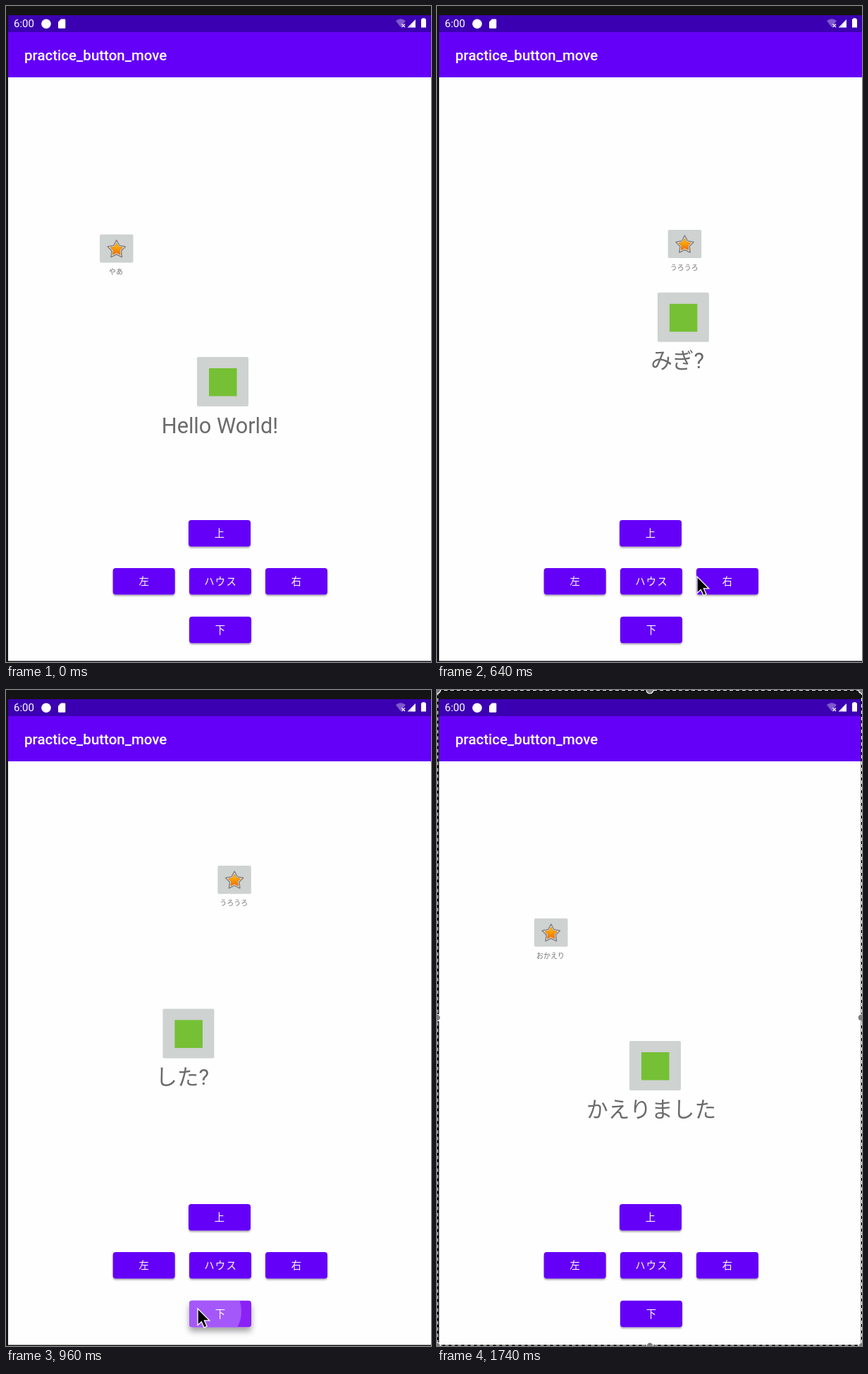
Write an HTML page that moves like this. It is 603x929 px and loops after 1760 ms.

```html
<!DOCTYPE html>
<html lang="ja">
<head>
<meta charset="utf-8">
<style>
html, body { margin: 0; width: 100%; height: 100%; overflow: hidden; background: #141414; }
svg { display: block; font-family: Roboto, "Noto Sans CJK JP", "Noto Sans CJK", sans-serif; }
.mid { text-anchor: middle; }
.key { font-size: 14.3px; letter-spacing: 1.3px; fill: #fff; text-anchor: middle; }
.say { font-size: 30.7px; fill: #6b6b6b; }
.note { font-size: 10px; fill: #757575; }
</style>
</head>
<body>
<svg width="603" height="929" viewBox="0 0 603 929">
  <defs>
    <linearGradient id="gold" x2="0" y2="1">
      <stop offset=".2" stop-color="#ffb400"/><stop offset="1" stop-color="#f06a10"/>
    </linearGradient>
    <filter id="low" x="-20%" y="-30%" width="140%" height="190%">
      <feDropShadow dx="0" dy="2" stdDeviation="1.3" flood-opacity=".32"/>
    </filter>
    <filter id="high" x="-20%" y="-30%" width="140%" height="200%">
      <feDropShadow dx="0" dy="6" stdDeviation="4" flood-opacity=".36"/>
    </filter>
    <clipPath id="face"><rect width="88" height="37.5" rx="4"/></clipPath>
  </defs>

  <rect width="603" height="929" fill="#141414"/>
  <rect x="3" y="13" width="600" height="914.5" fill="#fefefe"/>
  <rect x="3" y="13" width="600" height="24.5" fill="#3b00b1"/>
  <rect x="3" y="37" width="600" height="64" fill="#6500f8"/>
  <text x="11" y="30.3" font-size="15" fill="#fff">6:00</text>
  <text x="26" y="77" font-size="20.5" font-weight="500" fill="#fff">practice_button_move</text>
  <g fill="#fff">
    <circle cx="57" cy="25.3" r="6.8"/>
    <path d="M78 18.5h5q1.3 0 1.3 1.3v10.7q0 1.3-1.3 1.3h-7.7q-1.3 0-1.3-1.3v-8z"/>
    <path d="M553 21q7-5.5 14 0l-7 9z" opacity=".35"/>
    <path d="M561.5 25.5l4.5 4.5m0-4.5l-4.5 4.5" stroke="#fff" stroke-width="1.3"/>
    <path d="M581 19v11.5h-11.5z"/>
    <path d="M575.5 24.5v6h-6z" fill="#3b00b1" opacity=".15"/>
    <path d="M590.5 18.5v-1.3h4v1.3h1.5v12h-7v-12z"/>
  </g>

  <g id="star">
    <rect width="47.5" height="40" rx="2" fill="#ced2d1"/>
    <path id="rim" fill="#f4f4f4" stroke="#858585" stroke-width="1.6" stroke-linejoin="round"/>
    <path id="core" fill="url(#gold)" stroke="#d5790c" stroke-width=".8" stroke-linejoin="round"/>
    <text id="note" class="note mid" x="23" y="56.5"></text>
  </g>
  <g id="pet">
    <rect width="73" height="70" rx="2" fill="#ced2d1"/>
    <rect x="17" y="16" width="39.5" height="39.5" fill="#75c034"/>
  </g>
  <text id="say" class="say mid"></text>

  <g id="keys"></g>
  <path id="cursor" d="M0 0v23.5l5.3-5 3.8 8.3 4-1.8-3.7-8.1h7.3z" fill="#000" stroke="#fff" stroke-width="1.3"/>
  <g id="frame">
    <path d="M0 0H603V929H0z" fill="none" stroke="#000" stroke-width="3"/>
    <path d="M1 .5H602.5V928H1z" fill="none" stroke="#fff" stroke-width="1.2" stroke-dasharray="5 4"/>
  </g>
</svg>
<script>
const LOOP = 1760, STEP = 22.8;
const $ = id => document.getElementById(id);
const place = (el, x, y) => el.setAttribute('transform', `translate(${x} ${y})`);
const make = (parent, tag, attrs) => {
  const el = document.createElementNS('http://www.w3.org/2000/svg', tag);
  for (const k in attrs) el.setAttribute(k, attrs[k]);
  return parent.appendChild(el);
};

const starPath = r => 'M' + Array.from({ length: 10 }, (_, i) => {
  const a = i * Math.PI / 5, d = i % 2 ? r * .52 : r;
  return [23.8 + d * Math.sin(a), 21.3 - d * Math.cos(a)].map(v => v.toFixed(2));
}).join('L') + 'z';
$('rim').setAttribute('d', starPath(13.2));
$('core').setAttribute('d', starPath(9.2));

const keys = [['上', 259, 728], ['右', 368, 796], ['左', 151.7, 796], ['下', 260, 864.8], ['ハウス', 260, 796]]
  .map(([label, x, y]) => {
    const g = make($('keys'), 'g', {});
    place(g, x, y);
    const base = make(g, 'rect', { width: 88, height: 37.5, rx: 4 });
    const clip = make(g, 'g', { 'clip-path': 'url(#face)' });
    const ripple = make(clip, 'circle', { fill: '#a558fa' });
    make(g, 'text', { class: 'key', x: 44.6, y: 24 }).textContent = label;
    return { x, y, base, ripple };
  });

for (const [x, y] of [[0, 0], [302, 0], [603, 0], [0, 464], [602, 464], [0, 929], [302, 929], [603, 929]])
  make($('frame'), 'circle', { cx: x, cy: y, r: 5, fill: '#7d7d7d', stroke: '#fff', 'stroke-width': 1.2 });

// Per key: press times, step direction, speech, box x, text x, where the star ends
const phases = [
  { at: [220, 290, 360, 430], dx: 0, dy: -1, say: 'うえ?', box: 267.3, text: 295.5, star: [268, 340] },
  { at: [520, 580], dx: 1, dy: 0, say: 'みぎ?', box: 267.3, text: 295.5, star: [327.7, 317] },
  { at: [720, 750, 780, 810], dx: -1, dy: 0, say: 'ひだり?', box: 269.5, text: 297.5, star: [272.7, 295.7] },
  { at: [900, 940, 980, 1020, 1040], dx: 0, dy: 1, say: 'した?', box: 268, text: 295.7, star: [305, 215] }
];
const HOME = 1220, FRAME = 1660;

const track = [
  [100, 600, 940], [200, 292, 744], [440, 292, 744], [500, 398.5, 808], [600, 398.5, 808],
  [640, 369, 808], [700, 190, 812], [820, 190, 812], [860, 257, 862], [890, 272, 876],
  [1120, 272, 876], [1200, 299.5, 817], [1300, 299.5, 817], [1440, 420, 940]
];
function cursorAt(t) {
  const i = track.findIndex(p => p[0] > t);
  if (i < 1) return [700, 1000];
  const a = track[i - 1], b = track[i], u = (t - a[0]) / (b[0] - a[0]);
  return [1, 2].map(k => a[k] + (b[k] - a[k]) * u);
}

function stateAt(t) {
  if (t >= HOME) return { say: 'かえりました', note: 'おかえり', x: 273, y: 497, text: 304, star: [138, 323.5] };
  const s = { say: 'Hello World!', note: 'やあ', x: 271, y: 497, text: 303.5, star: [133, 323.5] };
  let mx = 0, my = 0;
  for (const p of phases) {
    const n = p.at.filter(v => v <= t).length;
    if (!n) break;
    mx += p.dx * n * STEP;
    my += p.dy * n * STEP;
    const u = n / p.at.length, sway = 25 * Math.sin(2 * Math.PI * u);
    Object.assign(s, {
      say: p.say, note: 'うろうろ', x: p.box + mx, y: 497 + my, text: p.text + mx,
      star: s.star.map((v, k) => v + (p.star[k] - v) * u + (k ? -sway : sway))
    });
  }
  return s;
}

function draw(t) {
  const s = stateAt(t), [cx, cy] = cursorAt(t);
  place($('star'), ...s.star);
  place($('pet'), s.x, s.y);
  place($('say'), s.text, s.y + 107.5);
  $('say').textContent = s.say;
  $('note').textContent = s.note;
  place($('cursor'), cx, cy);
  keys.forEach((key, i) => {
    const times = phases[i] ? phases[i].at : [HOME];
    const age = t - Math.max(-LOOP, ...times.filter(v => v <= t)), on = age < 40;
    key.base.setAttribute('fill', on ? '#8a22f8' : '#6500f8');
    key.base.setAttribute('filter', `url(#${on ? 'high' : 'low'})`);
    key.ripple.setAttribute('r', on ? 30 + age * .8 : 0);
    key.ripple.setAttribute('cx', (cx - key.x + 44) / 2);
    key.ripple.setAttribute('cy', (cy - key.y + 19) / 2);
  });
  $('frame').style.display = t >= FRAME ? '' : 'none';
}

const start = performance.now();
function tick(now) {
  const t = Math.max(0, now - start) % LOOP;
  draw(Math.floor(t / 20) * 20);
  requestAnimationFrame(tick);
}
draw(0);
requestAnimationFrame(tick);
</script>
</body>
</html>
```
